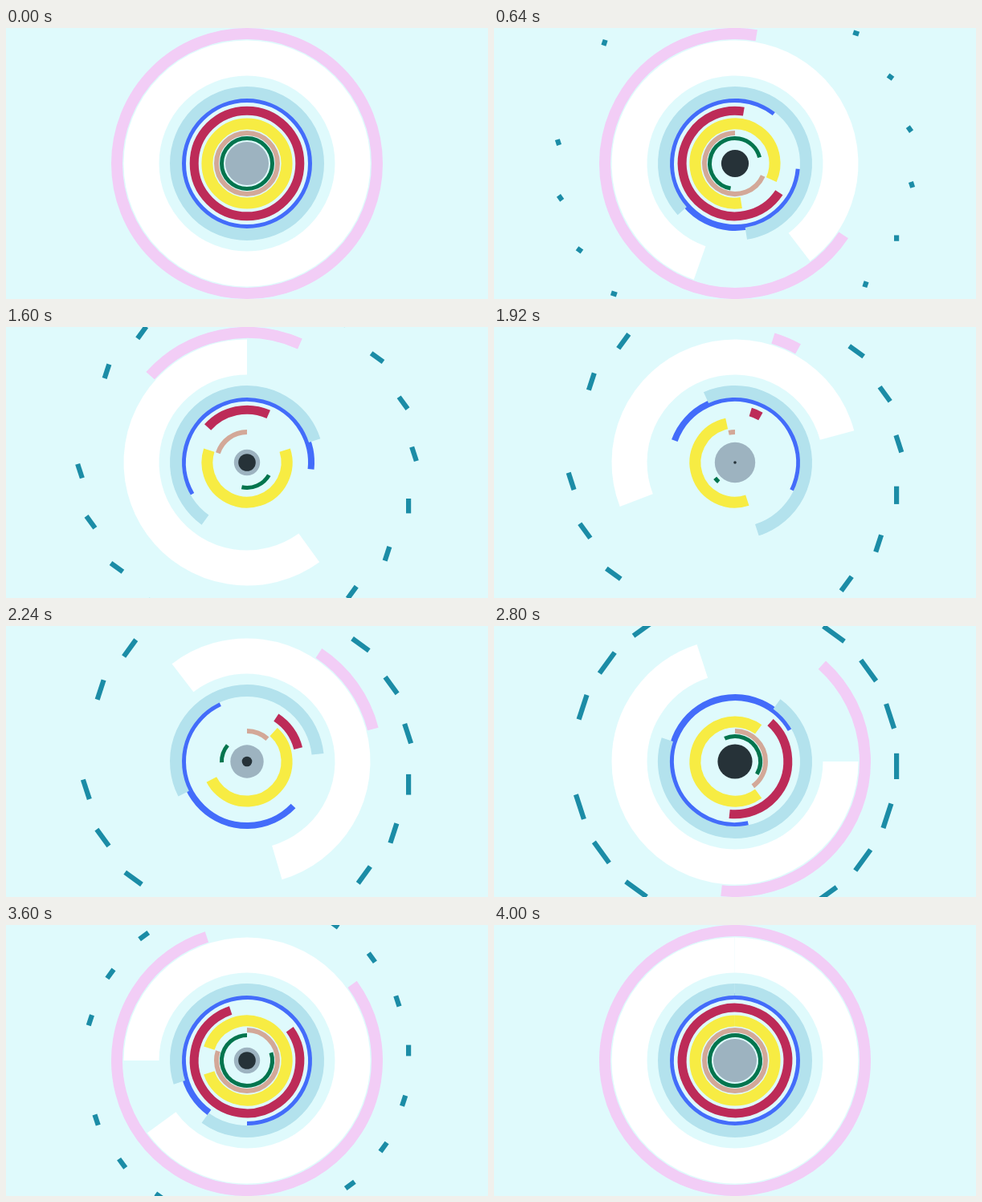
An HTML page with a canvas that plays this animation: 600 by 338 pixels, repeating every 4040 ms.

```html
<!DOCTYPE html>
<html lang="en">
<head>
<meta charset="utf-8">
<title>Rings</title>
<style>
  html, body { margin: 0; width: 100%; height: 100%; overflow: hidden; background: #dffafc; }
  canvas { display: block; width: 600px; height: 338px; }
</style>
</head>
<body>
<canvas id="stage" width="600" height="338"></canvas>
<script>
const ctx = document.getElementById('stage').getContext('2d');
const LOOP = 4040, STEP = 40, FPS = 30, HALF = 2000;
const rad = deg => deg * Math.PI / 180;

// sweep: degrees erased by mid-loop; turn: total rotation; shift: where the arc regrows from
const rings = [
  { r: 162,   w: 14, color: '#f2cdf6', sweep: 360, turn: 60 },
  { r: 131.5, w: 44, color: '#ffffff', sweep: 180, turn: 900, shift: 180 },
  { r: 80,    w: 8,  color: '#436cfa', sweep: 180, turn: 240 },
  { r: 88.5,  w: 15, color: '#b3e2ed', sweep: 180, turn: 1080 },
  { r: 65.8,  w: 11, color: '#bd2b58', sweep: 360, turn: 60 },
  { r: 49.6,  w: 14, color: '#f7ec43', sweep: 180, turn: 720 },
  { r: 38,    w: 6,  color: '#d3a898', sweep: 360, turn: 0 },
  { r: 31.5,  w: 5,  color: '#03754e', sweep: 360, turn: 480 }
];

function drawRing({ r, w, color, sweep, turn, shift = 0 }, u) {
  const first = u < 1;
  const from = turn * u / 2 + (first ? sweep * u : shift);
  const length = 360 - sweep * (first ? u : 2 - u);
  if (length <= 0) return;
  ctx.beginPath();
  ctx.arc(0, 0, r, rad(from - 90), rad(from + length - 90));
  ctx.lineWidth = w;
  ctx.strokeStyle = color;
  ctx.stroke();
}

function drawDisc(r, color) {
  ctx.beginPath();
  ctx.arc(0, 0, r, 0, 2 * Math.PI);
  ctx.fillStyle = color;
  ctx.fill();
}

// Tangent dashes: the head runs ahead of the tail along the same line
function drawDashes(t) {
  const along = k => 118.6 - 138 * Math.min(1, k);
  const head = along(t / 3000), tail = along(t / 4000);
  ctx.fillStyle = '#1b8ca6';
  for (let i = -9; i <= 9; i++) {
    ctx.save();
    ctx.rotate(rad(i * 18));
    ctx.fillRect(198, head, 6.2, tail - head);
    ctx.restore();
  }
}

function draw(t) {
  const u = t / HALF;
  const pupil = 27 * (1 - Math.abs(1 - 2 * (u % 1)));
  ctx.setTransform(1, 0, 0, 1, 0, 0);
  ctx.fillStyle = '#dffafc';
  ctx.fillRect(0, 0, 600, 338);
  ctx.translate(300, 169);
  drawDashes(t);
  rings.forEach(ring => drawRing(ring, u));
  drawDisc(27 - pupil, '#9db3c0');
  drawDisc(pupil, '#263238');
}

// Motion is stepped: 30 fps poses shown on a 40 ms clock
const start = performance.now();
function tick() {
  const step = Math.floor(((performance.now() - start) % LOOP + 0.5) / STEP);
  draw(Math.min(4000, Math.round(step * STEP * FPS / 1000) * 1000 / FPS));
  requestAnimationFrame(tick);
}
tick();
</script>
</body>
</html>
```
